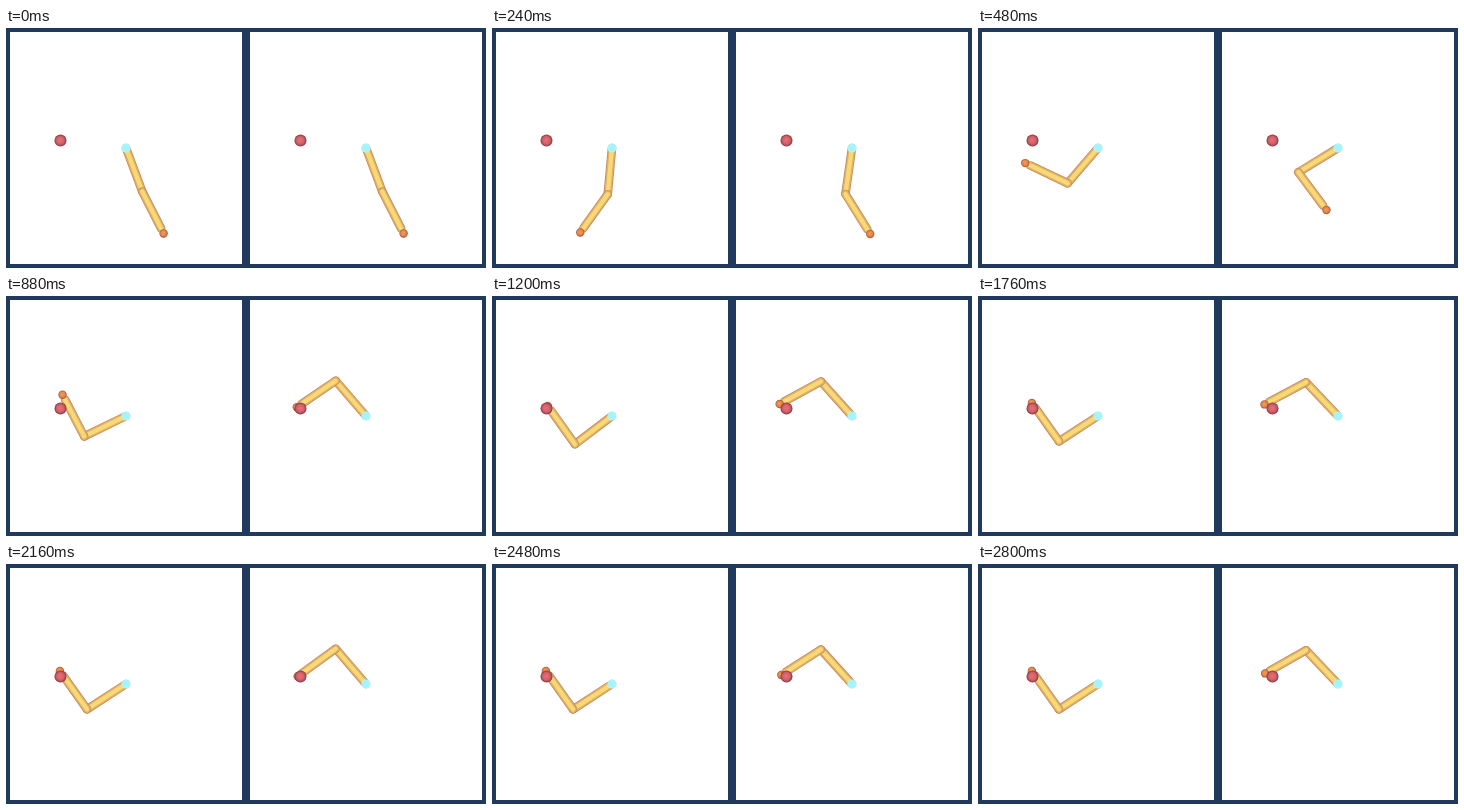
An HTML page with a canvas that plays this animation: 480x240 px, repeating every 2.88 s.

```html
<!DOCTYPE html>
<html lang="en">
<head>
<meta charset="utf-8">
<title>Two reaching arms</title>
<style>
  html, body { margin: 0; height: 100%; overflow: hidden; background: #203a5e; }
  canvas { display: block; }
</style>
</head>
<body>
<canvas id="stage" width="480" height="240"></canvas>
<script>
const ctx = document.getElementById('stage').getContext('2d');
const LOOP = 2880, STEP = 80;
const UPPER = 46.5, LOWER = 47, LINK = 41.5;

// Absolute link angles in degrees, clockwise from +x, at each key time
const times = [0, 480, 880, 1200, 1760, 2160, 2800];
const arms = [
  { x: 0, upper: [69.5, 130.7, 154, 142.7, 147, 147, 147],
    lower: [63, 205.4, 242.5, 234.5, 234.8, 234.8, 234.8] },
  { x: 240, upper: [69.5, 148.5, 229.3, 228, 226.5, 229.3, 226.5],
    lower: [63, 53.3, 145.8, 151.3, 151.9, 144, 150.5] }
];

// Monotone cubic interpolation
function sample(values, t) {
  const last = times.length - 1;
  const slope = i => (values[i + 1] - values[i]) / (times[i + 1] - times[i]);
  const tangent = i => {
    if (i === 0 || i === last) return 0;
    const a = slope(i - 1), b = slope(i);
    return a * b > 0 ? 2 * a * b / (a + b) : 0;
  };
  let i = 0;
  while (i < last - 1 && t >= times[i + 1]) i++;
  const h = times[i + 1] - times[i], s = (t - times[i]) / h, r = 1 - s;
  return values[i] * (1 + 2 * s) * r * r + values[i + 1] * s * s * (3 - 2 * s)
    + h * s * r * (tangent(i) * r - tangent(i + 1) * s);
}

function along([x, y], degrees, length) {
  const a = degrees * Math.PI / 180;
  return [x + length * Math.cos(a), y + length * Math.sin(a)];
}

function link(from, to) {
  ctx.lineCap = 'round';
  for (const [width, color] of [[8.6, '#bf8a68'], [7, '#e5b35f'], [4.2, '#f7d978']]) {
    ctx.lineWidth = width;
    ctx.strokeStyle = color;
    ctx.beginPath();
    ctx.moveTo(...from);
    ctx.lineTo(...to);
    ctx.stroke();
  }
}

function ball([x, y], radius, light, mid, dark) {
  const shade = ctx.createRadialGradient(x - 0.5, y - 0.5, 0, x, y, radius);
  shade.addColorStop(0, light);
  shade.addColorStop(0.65, mid);
  shade.addColorStop(1, dark);
  ctx.fillStyle = shade;
  ctx.beginPath();
  ctx.arc(x, y, radius, 0, 2 * Math.PI);
  ctx.fill();
}

function drawArm(arm, t) {
  ctx.fillStyle = '#fff';
  ctx.fillRect(arm.x + 4, 4, 232, 232);
  const base = [arm.x + 120, 120];
  const elbow = along(base, sample(arm.upper, t), UPPER);
  const angle = sample(arm.lower, t);
  link(base, elbow);
  link(elbow, along(elbow, angle, LINK));
  ball(base, 4.6, '#a5f3fb', '#a5f3fb', '#b4f5fb');
  ball(along(elbow, angle, LOWER), 4.2, '#f39a58', '#e6844a', '#94553c');
  ball([arm.x + 54.5, 112.5], 6, '#e5737a', '#d35d66', '#7c3841');
}

function frame(now) {
  const t = Math.floor(now % LOOP / STEP) * STEP;
  ctx.fillStyle = '#203a5e';
  ctx.fillRect(0, 0, 480, 240);
  arms.forEach(arm => drawArm(arm, t));
  requestAnimationFrame(frame);
}
frame(0);
</script>
</body>
</html>
```
